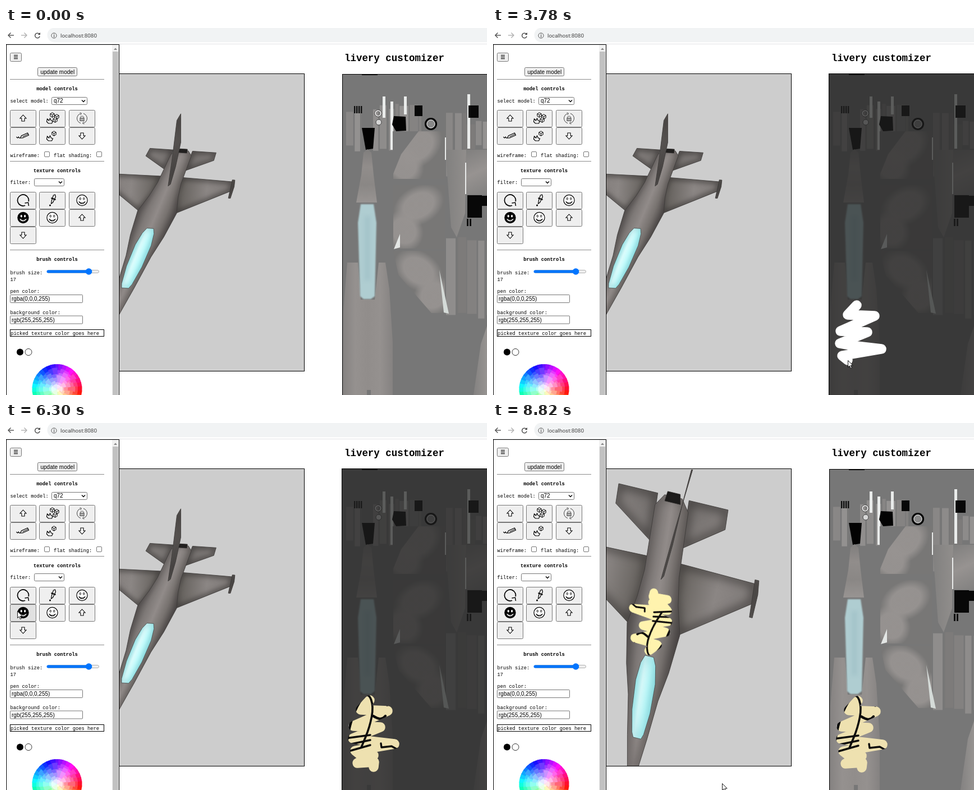
These frames come from a looping animation (857x654 px, 9000 ms). An HTML page with a canvas:

```html
<!DOCTYPE html>
<html lang="en">
<head>
<meta charset="utf-8">
<title>livery customizer</title>
<style>
html, body { margin: 0; width: 100%; height: 100%; overflow: hidden; background: #fff; }
canvas { display: block; }
</style>
</head>
<body>
<canvas id="stage" width="857" height="654"></canvas>
<script>
const W = 857, H = 654, LOOP = 9000, STEP = 180;
const MONO = '"Liberation Mono", monospace', SANS = '"Liberation Sans", sans-serif';
const INK = '#0b0b0b', TAN = '#eee1b0';
let g = document.getElementById('stage').getContext('2d');

// ---- helpers ----
const mix = (a, b, k) => a + (b - a) * k;
const clamp = k => Math.max(0, Math.min(1, k));
const ease = k => k * k * (3 - 2 * k);
const grey = v => `rgb(${v},${v - 2},${v - 3})`;
let seed = 11;
const random = (lo, hi) => {
  seed = (seed * 16807) % 2147483647;
  return mix(lo, hi, seed / 2147483647);
};
function layer(draw) {
  const c = document.createElement('canvas'), old = g;
  c.width = W; c.height = H;
  g = c.getContext('2d');
  draw();
  g = old;
  return c;
}
function at(x, y, draw) { g.save(); g.translate(x, y); draw(); g.restore(); }
function ink(fill, line, width = 1) {
  if (fill) { g.fillStyle = fill; g.fill(); }
  if (line) { g.strokeStyle = line; g.lineWidth = width; g.stroke(); }
}
function rect(x, y, w, h, fill, line) {
  if (fill) { g.fillStyle = fill; g.fillRect(x, y, w, h); }
  if (line) { g.strokeStyle = line; g.lineWidth = 1; g.strokeRect(x + .5, y + .5, w - 1, h - 1); }
}
function rounded(x, y, w, h, r, fill, line) {
  g.beginPath(); g.roundRect(x + .5, y + .5, w - 1, h - 1, r); ink(fill, line);
}
function trace(p) {
  g.beginPath();
  for (let i = 0; i < p.length; i += 2) g.lineTo(p[i], p[i + 1]);
}
function poly(p, fill, line, width) { trace(p); g.closePath(); ink(fill, line, width); }
function lines(p, color = '#000', width = 1) { trace(p); ink(null, color, width); }
function arc(x, y, r, from, to, color = '#000', width = 1) {
  g.beginPath(); g.arc(x, y, r, from, to); ink(null, color, width);
}
function disc(x, y, r, fill, line, width) { g.beginPath(); g.arc(x, y, r, 0, 7); ink(fill, line, width); }
function curve(p, width) {
  const n = p.length;
  g.beginPath(); g.moveTo(p[0], p[1]);
  for (let i = 2; i < n - 2; i += 2)
    g.quadraticCurveTo(p[i], p[i + 1], (p[i] + p[i + 2]) / 2, (p[i + 1] + p[i + 3]) / 2);
  g.lineTo(p[n - 2], p[n - 1]);
  ink(null, INK, width);
}
function linear([x0, y0], [x1, y1], ...colors) {
  const gr = g.createLinearGradient(x0, y0, x1, y1);
  colors.forEach((c, i) => gr.addColorStop(i / (colors.length - 1), c));
  return gr;
}
function glow(x, y, rx, ry, turn) {
  at(x, y, () => {
    g.rotate(turn); g.scale(rx, ry);
    const gr = g.createRadialGradient(0, 0, .6, 0, 0, 1);
    gr.addColorStop(0, 'rgba(151,147,145,.95)'); gr.addColorStop(1, 'rgba(151,147,145,0)');
    rect(-1, -1, 2, 2, gr);
  });
}
function text(s, x, y, font, color = '#000') { g.font = font; g.fillStyle = color; g.fillText(s, x, y); }
const mono = (s, x, y) => text(s, x, y, '8.78px ' + MONO);
const head = (s, y) => {
  g.textAlign = 'center';
  text(s, 91, y, 'bold 8.78px ' + MONO);
  g.textAlign = 'left';
};
const sans = (s, x, y) => text(s, x, y, '10px ' + SANS);

// ---- button icons, drawn around 0,0 ----
function cube(x, y) {
  const ring = [];
  for (let i = 0; i < 6; i++) ring.push(x + 4.2 * Math.sin(i * Math.PI / 3), y - 4.2 * Math.cos(i * Math.PI / 3));
  poly(ring, '#efefef', '#000');
  for (let i = 2; i < 12; i += 4) lines([x, y, ring[i], ring[i + 1]]);
}
function hand() {
  poly([-9, 1, -6, 4, -4, 0, -2, 4, 1, 5, -1, 9, -7, 9, -10, 6], '#efefef', '#000', 1.2);
}
function face(color, paper) {
  disc(0, 0, 9.6, paper, '#000', 1.2);
  [-3.2, 3.2].forEach(x => {
    g.beginPath(); g.ellipse(x, -2.8, 1.2, 1.9, 0, 0, 7); ink(paper === '#000' ? color : null, color, .9);
  });
  arc(0, 0, 6, .35, 2.8, color, 1.1);
  arc(0, -3, 7.5, .9, 2.24, color, .9);
}
const icons = {
  up: () => poly([0, -6, 5.5, 0, 2.5, 0, 2.5, 5, -2.5, 5, -2.5, 0, -5.5, 0], '#fff', '#000', 1.1),
  down: () => { g.rotate(Math.PI); icons.up(); },
  cubes: () => { cube(0, -6); cube(8, -3); cube(5, 3); hand(); },
  cube: () => { cube(3, -4); hand(); },
  lock: () => {
    [0, Math.PI].forEach(a => arc(0, 0, 9, a - 1.3, a + 1.2, '#444'));
    lines([-4, -10, -1, -9, -3, -6], '#444'); lines([4, 10, 1, 9, 3, 6], '#444');
    rect(-4, -1, 8, 6, '#aaa', '#555');
    arc(0, -1, 3, Math.PI, 0, '#555');
  },
  pencil: () => {
    poly([-5, 4, -3, 0, 8, -5, 10, -1, -1, 4], '#efefef', '#000', 1.2);
    lines([-1, 2, 9, -3]);
    lines([-12, 2, -10, 4, -8, 2, -7, 4, -5, 4], '#000', 1.2);
  },
  turn: () => {
    arc(0, 0, 10, 1.2, 6.5, '#000', 1.7);
    lines([3, 5, 9, 4, 10, 10], '#000', 1.5);
  },
  dropper: () => {
    poly([2, -9, 5, -10, 6, -6, 1, 4, -2, 6, -1, 0], '#efefef', '#000', 1.2);
    lines([-2, -4, 6, -1], '#000', 2);
    disc(-4, 9, 1.5, '#000');
  },
  smile: () => face('#000', '#fff'),
  dark: () => face('#fff', '#000')
};
const grid = (y, names) => names.split(' ').map((icon, i) =>
  ({ x: 7 + Math.round(52.4 * (i % 3)), y: y + 31 * Math.floor(i / 3), icon }));
const buttons = [
  ...grid(146, 'up cubes lock pencil cube down'),
  ...grid(292, 'turn dropper smile dark smile up down')
];
function button({ x, y, icon }, hot) {
  rounded(x, y, 47, 31, 2, hot ? '#e1e1e1' : '#efefef', '#767676');
  at(x + 23.5, y + 15, icons[icon]);
}

// ---- browser bar and side panel ----
function select(x, y, w, value) {
  rounded(x, y, w, 14, 2, '#fff', '#767676');
  lines([x + w - 10, y + 5.5, x + w - 7, y + 8.5, x + w - 4, y + 5.5], '#000', 1.4);
  sans(value, x + 4, y + 10);
}
function field(label, value, y) {
  mono(label, 7.5, y);
  rounded(7, y + 3, 130, 15, 1, '#fff', '#767676');
  sans(value, 10, y + 14);
}
function wheel(x, y, r) {
  const rings = 6;
  for (let i = rings; i > 0; i--) {
    const n = 6 * i, half = Math.PI / n;
    for (let j = 0; j < n; j++) {
      const a = (2 * j + i % 2) * half;
      g.beginPath(); g.moveTo(x, y);
      g.arc(x, y, r * i / rings + (i < rings ? random(-3, 3) : 0), a - half - 1.6, a + half - 1.55);
      ink(`hsl(${262 + a * 57.3},100%,${mix(100, 53, (i - .4) / (rings - .4))}%)`);
    }
  }
}
function browserBar() {
  rect(0, 0, W, 29, '#fff');
  rounded(73, -1, 820, 27, 13, '#f1f3f4');
  [[4, 10, '#444'], [37, -10, '#aaa']].forEach(([x, d, c]) => {
    lines([x, 13, x + d, 13], c, 1.3);
    lines([x + d * .45, 8.5, x, 13, x + d * .45, 17.5], c, 1.3);
  });
  arc(56, 13.5, 4.3, .3, 5.5, '#444', 1.4);
  poly([56.5, 12, 61, 12, 61, 8], '#444');
  disc(85.5, 13.5, 4.6, null, '#555');
  rect(85, 12.5, 1.2, 4, '#555'); rect(85, 10.5, 1.2, 1.2, '#555');
  text('localhost:8080', 97, 17, '9.9px Roboto, sans-serif', '#444');
  rect(0, 28, W, 1, '#e2e3e5');
}
const side = layer(() => {
  browserBar();
  rect(0, 29, 202, 640, '#fff', '#000');
  rect(189, 30, 12, 630, '#f1f1f1'); rect(190, 42, 10, 620, '#c1c1c1');
  poly([192, 39, 198, 39, 195, 35.5], '#888');
  rounded(7, 44, 21, 16, 2, '#efefef', '#767676');
  for (let y = 48; y < 56; y += 3) rect(14, y, 7, 1.2, '#000');
  rounded(56, 70, 71, 16, 2, '#efefef', '#767676');
  sans('update model', 61.5, 82);
  [91, 237, 395].forEach(y => rect(7, y, 168, 1, '#8c8c8c'));
  head('model controls', 111);
  mono('select model:', 7.5, 133); select(81, 123, 64, 'q72');
  mono('wireframe:', 7.5, 230); mono('flat shading:', 85, 230);
  [68, 161].forEach(x => rounded(x, 220, 10, 10, 1.5, '#fff', '#767676'));
  head('texture controls', 257);
  mono('filter:', 7.5, 278); select(50, 268, 54, '');
  head('brush controls', 415);
  mono('brush size:', 7.5, 439); mono('17', 7.5, 451);
  rounded(73, 431, 93, 6, 3, '#efefef', '#b2b2b2');
  rounded(72, 431, 76, 6, 3, '#0075ff');
  disc(147.5, 434, 5.8, '#0075ff');
  field('pen color:', 'rgba(0,0,0,255)', 472);
  field('background color:', 'rgb(255,255,255)', 509.5);
  rect(7, 537, 168, 13, '#fff', '#000'); mono('picked texture color goes here', 8.3, 546.5);
  disc(25, 577.5, 6, '#000'); disc(40, 577.5, 6, '#fff', '#000', .8);
  wheel(91, 643.5, 44.5);
  buttons.forEach(b => button(b));
});

// ---- texture sheet ----
function strips(x, end, top, bottom) {
  while (x < end) {
    const w = random(6, 18);
    rect(x, top + random(0, 12), Math.min(w, end - x), bottom - top - random(0, 14), grey(random(118, 148)));
    x += w + random(0, 5);
  }
}
function softPanel(y, h, turn) {
  g.save();
  g.beginPath(); g.rect(690, y, 92, h); g.clip();
  rect(690, y, 92, h, '#787776');
  glow(735, y + h * .32, 48, 34, turn);
  glow(735 - 26 * Math.sign(-turn), y + h * .72, 34, 38, turn);
  g.restore();
}
const texture = layer(() => {
  rect(599, 82, 300, 600, '#777');
  rect(634, 82, 28, 2, '#000');
  strips(606, 634, 145, 217); strips(654, 740, 135, 214); strips(784, 820, 145, 260);
  strips(784, 857, 370, 509); strips(820, 857, 160, 217);
  rect(820, 217, 37, 80, linear([820, 217], [857, 297], '#807f7e', '#979391', '#828180'));
  poly([783, 217, 820, 217, 818, 330, 803, 373, 793, 355], linear([783, 0], [820, 0], '#81807f', '#918e8c'));
  // bright and black slivers: x, y, width, height
  [[671, 122, 5, 38], [685, 131, 5, 86], [709, 122, 5, 32], [822, 118, 5, 97], [782, 195, 2, 40], [818, 240, 2, 56]]
    .forEach(r => rect(...r, '#e9ebea'));
  [[728, 138, 14, 19], [824, 138, 18, 22], [822, 298, 26, 40], [848, 299, 9, 18]].forEach(r => rect(...r, '#080808'));
  for (let x = 620; x < 636; x += 4) rect(x, 139, 2.4, 13, '#111');
  for (let x = 821; x < 831; x += 5) rect(x, 340, 3, 13, '#111');
  disc(663, 152, 6, null, '#111', 1); disc(663, 152, 5, null, '#f4f4f4', 1.6);
  disc(664, 168, 5, '#d6d6d6', '#444');
  disc(757, 171, 9.5, '#888', '#050505', 3.2); disc(757, 171, 7, null, '#e0e0e0');
  poly([691, 157, 712, 158, 713, 183, 695, 184, 688, 172], '#030303');
  poly([634, 178, 657, 178, 654, 215, 641, 217], '#030303');
  // large panels
  softPanel(184, 85, -.75); softPanel(280, 113, -.5); softPanel(397, 111, .6);
  poly([689, 184, 735, 184, 704, 225, 689, 262], '#777');
  poly([690, 397, 699, 440, 758, 508, 690, 508], '#777');
  poly([691, 394, 702, 367, 702, 391], '#e3e6e4');
  poly([772, 431, 780, 468, 789, 509, 780, 507], '#d5dbd8');
  poly([857, 531, 846, 563, 833, 654, 857, 654], linear([835, 0], [857, 0], '#858382', '#979492'));
  poly([637, 222, 644, 216, 651, 222, 655, 262, 661, 311, 624, 311, 633, 262],
    linear([0, 216], [0, 311], '#807e7d', '#918d8b', '#8a8785', '#989492'));
  poly([608, 418, 627, 418, 632, 484, 657, 484, 664, 418, 676, 418, 683, 465, 689, 560, 689, 654, 600, 654, 601, 505],
    linear([600, 0], [689, 0], '#858281', '#95918f', '#918d8b', '#95918f', '#858281'));
  rect(643, 645, 7, 9, '#777');
  g.filter = 'blur(.8px)';
  poly([632, 314, 655, 314, 660, 347, 657, 478, 650, 483, 637, 483, 631, 478, 627, 347], '#afcdd1');
  g.filter = 'blur(3px)';
  rect(639, 335, 10, 115, 'rgba(150,185,192,.4)');
});

// ---- cat stamp and the brush stroke that masks it ----
function cat() {
  rect(590, 419, 188, 221, '#fff');
  g.lineCap = g.lineJoin = 'round';
  poly([599, 428, 630, 426, 643, 437, 690, 438, 757, 436, 777, 443, 770, 462, 750, 482,
    753, 510, 762, 552, 767, 640, 611, 640, 613, 560, 622, 510, 637, 470, 615, 452], TAN, INK, 4);
  curve([614, 552, 621, 512, 639, 472, 654, 459, 663, 483, 656, 520, 641, 556], 3.6);
  for (let i = 0; i < 3; i++) {
    lines([590, 543 + 14 * i, 657, 534 + 9 * i], INK, 3.4);
    lines([747 + 2 * i, 539 + 9 * i, 778, 530 + 14 * i], INK, 3.4);
  }
  [716, 749].forEach(x => lines([x, 588, x, 640], INK, 3.4));
  lines([674, 473, 687, 481], INK, 3.4); lines([717, 482, 737, 471], INK, 3.4);
  [662, 712].forEach(x => curve([x, 500, x + 10, 506, x + 18, 504, x + 22, 500], 4.4));
  poly([695, 534, 724, 532, 711, 544], '#f3aebb', INK, 2.5);
  lines([676, 549, 677, 556, 695, 554, 704, 559, 716, 556, 720, 549], INK, 3.4);
}
const STROKE = [648, 494, 632, 511, 680, 513, 619, 540, 667, 542, 618, 562, 640, 566,
  692, 572, 622, 584, 632, 592, 655, 592, 626, 606, 656, 604, 655, 613];
const DRAW_FROM = 2430, PER_POINT = 150, LAST = STROKE.length / 2 - 1;
const DRAW_TO = DRAW_FROM + LAST * PER_POINT;
function strokeAt(i) {
  const n = Math.min(Math.floor(i), LAST - 1), [x0, y0, x1, y1] = STROKE.slice(2 * n);
  return [mix(x0, x1, i - n), mix(y0, y1, i - n)];
}
function scribble(i) {
  g.save();
  g.lineCap = g.lineJoin = 'round';
  lines([...STROKE.slice(0, Math.floor(i) * 2 + 2), ...strokeAt(i)], '#fff', 17.5);
  g.restore();
}
const livery = layer(() => {
  scribble(LAST);
  g.globalCompositeOperation = 'source-in';
  g.drawImage(layer(() => {
    rect(560, 470, 180, 170, TAN);
    g.translate(-8, 22); cat();
  }), 0, 0);
});

// ---- jet: metres from the nozzle (s), from the axis (u) and above it (h) ----
// Each camera: origin, then screen steps for s, u and h, then perspective along s
const CAMERAS = [
  [316, 217, -5.6, 13.3, 21, 1.4, -1.2, -18, .027],
  [322, 128, -5.3, 35.1, 34.8, 8.4, 11, -24, 0]
];
function camera(k) {
  const c = CAMERAS[0].map((v, i) => mix(v, CAMERAS[1][i], k));
  return (s, u = 0, h = 0) => {
    const z = 1 / (1 - c[8] * s);
    return [0, 1].map(i => c[i] + z * (s * c[2 + i] + u * c[4 + i] + h * c[6 + i]));
  };
}
const mirror = half => [...half, ...half.map(([s, u]) => [s, -u]).reverse()];
const STAB = [[.1, .8], [.1, 2.8], [1.1, 2.8], [2.5, .85], [1, .8]];
const WING = [[3.3, .8], [3.4, 4.7], [4.4, 4.7], [6.8, 1.3], [5, .8]];
const RAIL = [[3.2, 4.65], [3.2, 4.85], [3.9, 4.9], [5.1, 4.8], [5.1, 4.65]];
const NOZZLE = mirror([[-.1, .32], [.4, .4]]);
const BODY = mirror([[.1, .45], [.7, .85], [4, .88], [5.4, 1.05], [6.8, 1.35], [8.8, 1.08], [10.3, .76], [12.3, .5], [14.6, .15]]);
const CANOPY = mirror([[8.2, .22], [8.6, .38], [9.5, .5], [11, .46], [12.1, .3], [12.35, .2]]);
const FIN = [[4.3, 0, 0], [2.8, 0, 1.6], [1.2, 0, 3.7], [.2, .05, 3.7], [1.2, .2, 1.6], [2.9, .2, .6], [4.1, .12, 0]];

function drawJet(k, painted) {
  const eye = camera(k), size = mix(1, 1.66, k);
  const plate = (points, fill, edge = 'rgba(50,47,46,.75)') => {
    g.save();
    poly(points.flatMap(p => eye(...p)), fill, '#3d3a39', .8);
    g.clip();
    g.filter = `blur(${5 * size}px)`;
    ink(null, edge, 7 * size);
    g.restore();
  };
  // Gradient square to the axis, so it follows the length of the body
  const across = (s, w, ...colors) => {
    const [x, y] = eye(s), [x1, y1] = eye(s + 1), [ex, ey] = eye(s, w);
    const d = Math.hypot(x1 - x, y1 - y), r = Math.hypot(ex - x, ey - y);
    const nx = (y1 - y) / d * r, ny = (x - x1) / d * r;
    return linear([x - nx, y - ny], [x + nx, y + ny], ...colors);
  };
  g.save();
  g.beginPath(); g.rect(202, 83, 329, 528); g.clip();
  [-1, 1].forEach(dir => {
    const flip = part => part.map(([s, u]) => [s, u * dir]);
    plate(flip(STAB), linear(eye(0, dir), eye(1.5, 2.8 * dir), '#6f6b69', '#898482'));
    plate(flip(WING), linear(eye(4, dir), eye(4, 4.7 * dir), '#67635f', '#8b8684', '#7f7a78'));
    plate(flip(RAIL), '#6d6967');
  });
  plate(BODY, across(6, 1.3, '#5a5655', '#7d7876', '#918b89', '#77726f', '#4e4a49'), 'rgba(50,47,46,.4)');
  if (painted) {
    const unit = .0245, o = eye(6.5), a = eye(6.5, -1), b = eye(5.5);
    g.save();
    g.transform((a[0] - o[0]) * unit, (a[1] - o[1]) * unit, (b[0] - o[0]) * unit, (b[1] - o[1]) * unit, ...o);
    g.filter = 'brightness(1.08) saturate(1.3)';
    g.drawImage(livery, -645, -553);
    g.restore();
  }
  plate(NOZZLE, '#080808');
  plate(CANOPY, across(10, .5, '#a5eef1', '#e2ffff', '#bdfafb', '#96e4e8'), 'rgba(110,190,196,.5)');
  plate(FIN, across(2, .9, '#75706e', '#6a6664', '#514d4c'));
  g.restore();
}

// ---- pointer: time, x, y ----
const STOPS = [[360, 420, 660], [1260, 130, 307], [1620, 130, 307], [DRAW_FROM, 648, 494], [DRAW_TO, 655, 613],
  [4680, 83, 335], [5220, 681, 571], [5400, 673, 593], [5580, 673, 593], [6300, 20, 335], [6480, 20, 335],
  [7020, 95, 76], [7740, 265, 305], [8100, 265, 305], [8820, 408, 642]];
function pointer(t) {
  if (t < STOPS[0][0]) return null;
  if (t >= DRAW_FROM && t <= DRAW_TO) return strokeAt((t - DRAW_FROM) / PER_POINT);
  const n = Math.max(1, STOPS.findIndex(p => p[0] >= t)), a = STOPS[n - 1], b = STOPS[n];
  const k = ease((t - a[0]) / (b[0] - a[0]));
  return [mix(a[1], b[1], k), mix(a[2], b[2], k)];
}
function arrow([x, y]) {
  at(x + .5, y + .5, () =>
    poly([0, 0, 0, 12, 2.8, 9.4, 4.8, 14, 6.8, 13.1, 4.8, 8.7, 8.6, 8.7], '#fff', '#000', .9));
}

function scene(t) {
  const masked = t >= 1620 && t < 6480;
  const holding = t >= 4860 && t < 5580;
  const tip = pointer(t);

  rect(0, 0, W, H, '#fff');
  text('livery customizer', 603, 59, 'bold 17.45px ' + MONO);
  rect(201, 81, holding ? 330 : 331, 531, '#cdcdcd', '#000');
  drawJet(ease(clamp((t - 7920) / 720)), t >= 7200);

  const left = holding ? 596 : masked ? 598 : 599, top = masked ? 81 : 82;
  g.drawImage(texture, 0, holding ? 2 : 0);
  if (masked) rect(left, top, 300, 600, 'rgba(32,32,32,.7)');
  rect(left, top, 300, 600, null, '#000');
  if (holding) rect(600, 83, 300, 600, null, '#222');
  if (t >= 5580) g.drawImage(livery, masked ? 0 : 2, masked ? 0 : 1);
  else if (t >= DRAW_FROM) scribble(Math.min(LAST, (t - DRAW_FROM) / PER_POINT));

  g.drawImage(side, 0, 0);
  if (!tip) return;
  const hot = buttons.find(({ x, y }) => tip[0] > x && tip[0] < x + 47 && tip[1] > y && tip[1] < y + 31);
  if (hot) button(hot, true);
  if (holding) at(Math.round(tip[0] - 681), Math.round(tip[1] - 571), () => {
    rect(538, 383, 292, 292, null, '#333');
    cat();
  });
  arrow(tip);
}

function tick(now) {
  scene(Math.floor((now % LOOP) / STEP) * STEP);
  requestAnimationFrame(tick);
}
requestAnimationFrame(tick);
</script>
</body>
</html>
```
